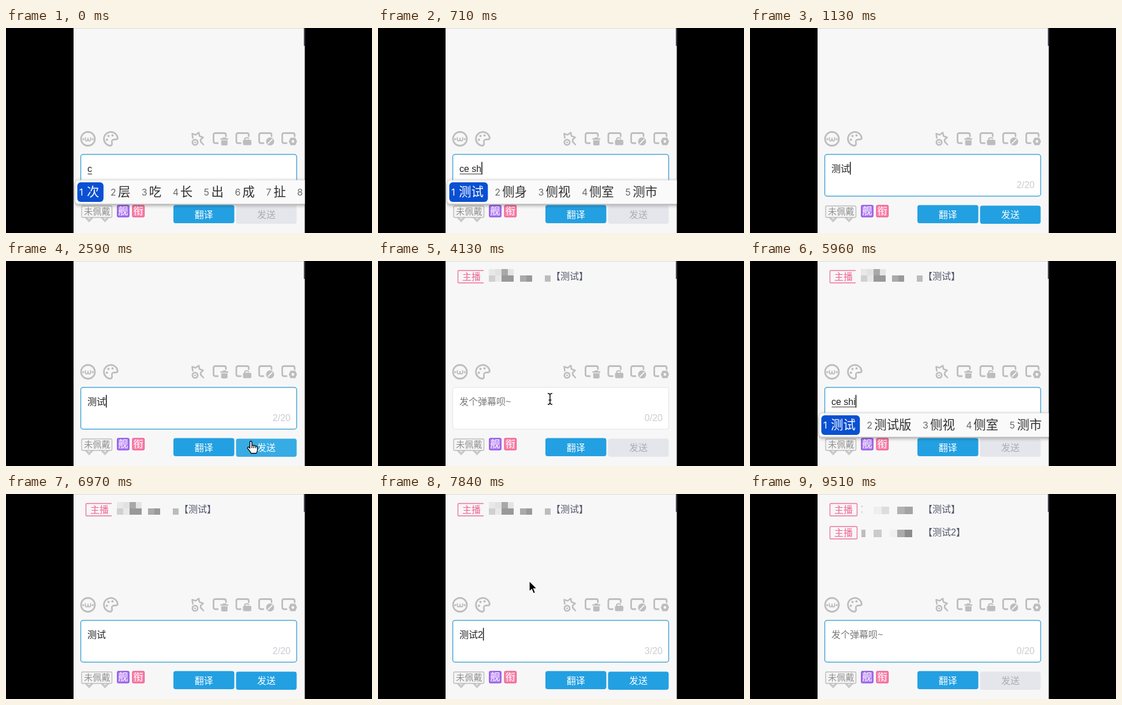
Recreate the animation shown at these times as an HTML page. Size 634 by 356 pixels, loop 9590 ms.

```html
<!DOCTYPE html>
<html lang="zh-CN">
<head>
<meta charset="utf-8">
<style>
html, body { margin: 0; width: 100%; height: 100%; overflow: hidden; background: #000; }
svg { display: block; width: 634px; height: 356px; }
text { font: 16px "Liberation Sans", "Noto Sans CJK SC", "Noto Sans CJK", sans-serif; }
.icons { fill: none; stroke: #bdbdbd; stroke-width: 2.8; stroke-linecap: round; stroke-linejoin: round; }
.icons .solid { fill: #bdbdbd; stroke: none; }
.mid { text-anchor: middle; }
#popup text { font-size: 21.4px; font-weight: 500; fill: #303030; }
#popup .num { font: 16px Inter, sans-serif; fill: #6b6b6b; }
#popup .on { fill: #fff; }
</style>
</head>
<body>
<svg viewBox="0 0 634 356">
  <defs>
    <clipPath id="panel"><rect x="117" width="400.5" height="356"/></clipPath>
    <filter id="shade" x="-10%" y="-50%" width="120%" height="200%">
      <feDropShadow dx="0" dy="2" stdDeviation="3" flood-opacity=".38"/>
    </filter>
    <path id="frame" d="M9 19H4.500Q1.500 19 1.500 16V4.500Q1.500 1.500 4.500 1.500H20Q23 1.500 23 4.500V7"/>
  </defs>
  <rect width="634" height="356"/>
  <g clip-path="url(#panel)">
    <rect x="117" width="401" height="356" fill="#f7f7f7"/>
    <path d="M117 .5H517" stroke="#d9d9d9"/>
    <path d="M517 31V356" stroke="#ccdde3"/>
    <path d="M516.800 0V31" stroke="#23263a" stroke-width="1.600"/>
    <g id="chat"></g>

    <g class="icons">
      <circle cx="142" cy="192.500" r="12"/>
      <path d="M137.500 190.500Q136.500 196 139.500 196Q142 196 142 191.500Q142 196 144.500 196Q147.500 196 146.500 190.500" stroke-width="2"/>
      <g class="solid">
        <circle cx="133.800" cy="193" r="1.700"/><circle cx="150.200" cy="193" r="1.700"/>
        <circle cx="174.800" cy="194" r="2"/><circle cx="177.500" cy="187.500" r="2"/><circle cx="184.500" cy="186.500" r="2"/>
      </g>
      <path d="M181 204.500A12 12 0 1 1 193.500 191Q193 194 189 193.500Q182 193.500 183.500 199Q184.500 203.500 181 204.500Z"/>
      <path d="M323.500 191L322.500 183.500L328.500 185.500L334 181.500L335 187.500L341.500 190L337 194L338 199M337 197L342 202.500" stroke-width="2.600"/>
      <circle cx="327.500" cy="198.500" r="4.600"/>
      <circle class="solid" cx="327.500" cy="198.500" r="1.600"/>
      <use href="#frame" x="358" y="181"/>
      <use href="#frame" x="397.500" y="181"/>
      <use href="#frame" x="437" y="181"/>
      <use href="#frame" x="477" y="181"/>
      <path class="solid" d="M371.500 191.500H375.500V190H381V191.500H385V194H371.500ZM372.800 195H383.800V201.500Q383.800 204 381 204H375.500Q372.800 204 372.800 201.500Z"/>
      <rect class="solid" x="410.500" y="194" width="14.500" height="9.500" rx="2.500"/>
      <path d="M413.500 194V193Q414 190.500 417 190.500Q419.500 190.500 420 192" stroke-width="2.200"/>
      <circle class="solid" cx="457.500" cy="197" r="7"/>
      <path d="M454 200.500L461 193.500" stroke="#f7f7f7" stroke-width="1.800"/>
      <path d="M493.500 191.500H500.500L503 197L500.500 202.500H493.500L491 197Z" fill="#bdbdbd" stroke-width="2"/>
      <circle cx="497" cy="197" r="2.400" fill="#f7f7f7" stroke="none"/>
    </g>

    <rect id="box" x="129.500" y="219.500" width="374" height="72.500" rx="4" fill="#fff"/>
    <text id="hint" x="141" y="249.500" fill="#777">发个弹幕呗~</text>
    <text id="typed" x="141" y="249.500" fill="#222"></text>
    <path id="under" stroke="#333" stroke-width="1.200"/>
    <path id="caret" stroke="#111" stroke-width="1.500"/>
    <text id="count" x="493" y="278" text-anchor="end" fill="#c9ccd0"></text>

    <path d="M136 329H152L144 337.500ZM163.500 329H179.500L171.500 337.500Z" fill="#c9c9c9"/>
    <path d="M141 329H147L144 332ZM168.500 329H174.500L171.500 332Z" fill="#f7f7f7"/>
    <rect x="131" y="309" width="52.500" height="20" rx="2" fill="#f4f4f4" stroke="#bcbcbc" stroke-width="1.400"/>
    <text class="mid" x="157.800" y="324.300" fill="#8f8f8f" style="font-size:15.200px">未佩戴</text>
    <rect x="193" y="308" width="20" height="20" rx="2" fill="#b27df5" stroke="#8750e0" stroke-width="1.600"/>
    <text class="mid" x="203" y="324.300" fill="#fff" style="font-size:17px">舰</text>
    <rect x="219.300" y="308" width="20" height="20" rx="2" fill="#fa86ae" stroke="#ef5b8f" stroke-width="1.600"/>
    <text class="mid" x="229.300" y="324.300" fill="#fff" style="font-size:17px">衔</text>

    <rect x="290" y="307.500" width="105.500" height="31.500" rx="4" fill="#23a0e2"/>
    <text class="mid" x="342.800" y="329.500" fill="#fff">翻译</text>
    <rect id="send" x="398.500" y="308.500" width="105" height="31.500" rx="4"/>
    <text id="sendText" class="mid" x="451" y="330">发送</text>

    <g id="popup"></g>
    <g id="mouse">
      <path id="arrow" d="M0 0V18.500L4.300 14.600L7.300 21.800L10.600 20.400L7.600 13.400H13.300Z" fill="#000" stroke="#fff" stroke-width="1.300"/>
      <path id="beam" d="M-4 -9.500Q0 -9.500 0 -6.500Q0 -9.500 4 -9.500M0 -7V7M-4 9.500Q0 9.500 0 6.500Q0 9.500 4 9.500M-2.500 2H2.500" fill="none" stroke="#111" stroke-width="1.600"/>
      <path id="hand" d="M-4.500 2V-8Q-4.500 -10 -2.700 -10Q-1 -10 -1 -8V-2.500Q.5 -4 2.300 -2.200Q4 -3.500 5.500 -1.500Q8.500 -2 8.500 1.500V5Q8.500 8 6.500 11H-2.500Q-4 7.500 -8 3Q-9.500 1 -7.500 0Q-6 0 -4.500 2ZM-1 -2.500V2M2.300 -2V2M5.500 -1.500V2" fill="#fff" stroke="#000" stroke-width="1.300" stroke-linejoin="round"/>
    </g>
  </g>
</svg>
<script>
const LOOP = 9590;
const $ = id => document.getElementById(id);
const show = (id, on) => $(id).style.display = on ? '' : 'none';

// time, text, input focused
const edits = [
  [-600, 'c', 1], [170, 'ce', 1], [400, 'ce s', 1], [560, 'ce sh', 1], [720, 'ce shi', 1], [1040, '测试', 1],
  [3060, '', 0], [4400, '', 1],
  [5130, 'c', 1], [5300, 'ce', 1], [5480, 'ce s', 1], [5600, 'ce sh', 1], [5750, 'ce shi', 1], [6300, '测试', 1],
  [7350, '测试2', 1], [8700, '', 1]
];
const candidates = {
  'c': '次 层 吃 长 出 成 扯 才',
  'ce': '测 侧 策 册 厕 恻 测试 测',
  'ce s': '测试 测速 测算 侧身 厕所',
  'ce sh': '测试 侧身 侧视 侧室 测市',
  'ce shi': '测试 测试版 侧视 侧室 测市'
};
// time, x, y for each visible stretch of the pointer
const paths = [
  [[2100, 380, 268], [2450, 427, 323], [3450, 427, 323], [4050, 298, 239.5], [5130, 298, 239.5]],
  [[7450, 298, 239.5], [7800, 262, 151], [8700, 262, 151]]
];
// x, y, width, height, grey level
const mosaicA = [
  [192, 14, 11, 11, 232], [203, 14, 11, 11, 226], [214, 14, 11, 11, 168], [225, 14, 10, 11, 228],
  [192, 25, 11, 11, 208], [203, 25, 11, 11, 232], [214, 25, 21, 11, 153],
  [246, 25, 11, 11, 170], [257, 25, 10, 11, 153], [289, 25, 10, 11, 188]
];
const mosaicB = [
  [193, 20, 2, 3, 205], [193, 30, 2, 3, 215], [214, 22, 14, 13, 238], [228, 22, 13, 13, 221],
  [255, 22, 13, 13, 178], [268, 22, 14, 13, 163],
  [193, 62, 7, 13, 190], [214, 62, 14, 13, 203], [242, 62, 13, 13, 240],
  [255, 62, 13, 13, 170], [268, 62, 13, 13, 140]
];

const tiles = list => list.map(([x, y, w, h, g]) =>
  `<rect x="${x}" y="${y}" width="${w}" height="${h}" fill="rgb(${g},${g},${g})"/>`).join('');

function message(y, text, open) {
  const outline = open ? 'M183 0H140Q138.5 0 138.5 1.500V20Q138.500 21.500 140 21.500H183'
                       : 'M140 0H184Q185.500 0 185.500 1.500V20Q185.500 21.500 184 21.500H140Q138.500 21.500 138.500 20V1.500Q138.500 0 140 0Z';
  return `<g transform="translate(0 ${y})"><path d="${outline}" fill="none" stroke="#ef6f9b" stroke-width="1.400"/>
    <text class="mid" x="162" y="16.800" fill="#ef6491">主播</text>
    <text x="300" y="15.500" fill="#50546a">【${text}】</text></g>`;
}

function chat(t) {
  if (t < 3250) return '';
  if (t < 8800) return message(16.5, '测试', true) + tiles(mosaicA);
  return message(16.5, '测试') + message(56.5, '测试2') + tiles(mosaicB);
}

function popup(text) {
  const words = candidates[text];
  if (!words) return '';
  let x = 127, out = '<rect x="119.500" y="264" width="420" height="41.500" rx="6" fill="#fafafa" stroke="#c8c8c8" stroke-width=".6" filter="url(#shade)"/>';
  words.split(' ').forEach((word, i) => {
    const end = x + 13 + word.length * 21.4, on = i ? '' : 'on';
    if (!i) out += `<rect x="123.500" y="268" width="${end - 116}" height="34" rx="6" fill="#0a50d2"/>`;
    out += `<text class="num ${on}" x="${x}" y="291">${i + 1}</text><text class="${on}" x="${x + 13}" y="292">${word}</text>`;
    x = end + 19.5;
  });
  return out;
}

function pointer(t) {
  const path = paths.find(p => t >= p[0][0] && t < p[p.length - 1][0]);
  if (!path) return null;
  const i = path.findIndex(p => p[0] > t), [t0, x0, y0] = path[i - 1], [t1, x1, y1] = path[i];
  const u = (t - t0) / (t1 - t0), e = u * u * (3 - 2 * u);
  return [x0 + (x1 - x0) * e, y0 + (y1 - y0) * e];
}

const inside = ([x, y], l, top, r, b) => x > l && x < r && y > top && y < b;

const cache = {};
function setHTML(id, html) {
  if (cache[id] !== html) $(id).innerHTML = cache[id] = html;
}

function draw(t) {
  const [since, text, focused] = edits.filter(e => e[0] <= t).pop();
  const composing = text in candidates, ready = text && !composing;
  setHTML('chat', chat(t));
  setHTML('popup', popup(text));
  setHTML('typed', text);

  $('box').setAttribute('stroke', focused ? '#46a5d8' : '#e1e3e6');
  $('box').setAttribute('stroke-width', focused ? 1.5 : 1);
  $('count').textContent = (composing ? 0 : text.length) + '/20';
  show('hint', !text);
  const end = 141 + (text ? $('typed').getComputedTextLength() : 0);
  $('under').setAttribute('d', composing ? `M141.500 253.500H${end}` : '');
  $('caret').setAttribute('d', `M${end + .7} 232.500V254.500`);
  show('caret', focused && (t - since) % 1060 < 530);

  const at = pointer(t);
  const onSend = at && inside(at, 398, 308, 504, 340);
  $('send').setAttribute('fill', !ready ? '#e4e6eb' : onSend ? '#37abe4' : '#23a0e2');
  $('sendText').setAttribute('fill', ready ? '#fff' : '#a9adb4');

  show('mouse', at);
  if (!at) return;
  const kind = inside(at, 129, 219, 504, 292) ? 'beam'
    : onSend && ready || inside(at, 290, 307, 396, 339) ? 'hand' : 'arrow';
  for (const k of ['arrow', 'beam', 'hand']) show(k, k === kind);
  $('mouse').setAttribute('transform', `translate(${at})`);
}

const start = performance.now();
function tick() {
  draw((performance.now() - start) % LOOP);
  requestAnimationFrame(tick);
}
tick();
</script>
</body>
</html>
```
